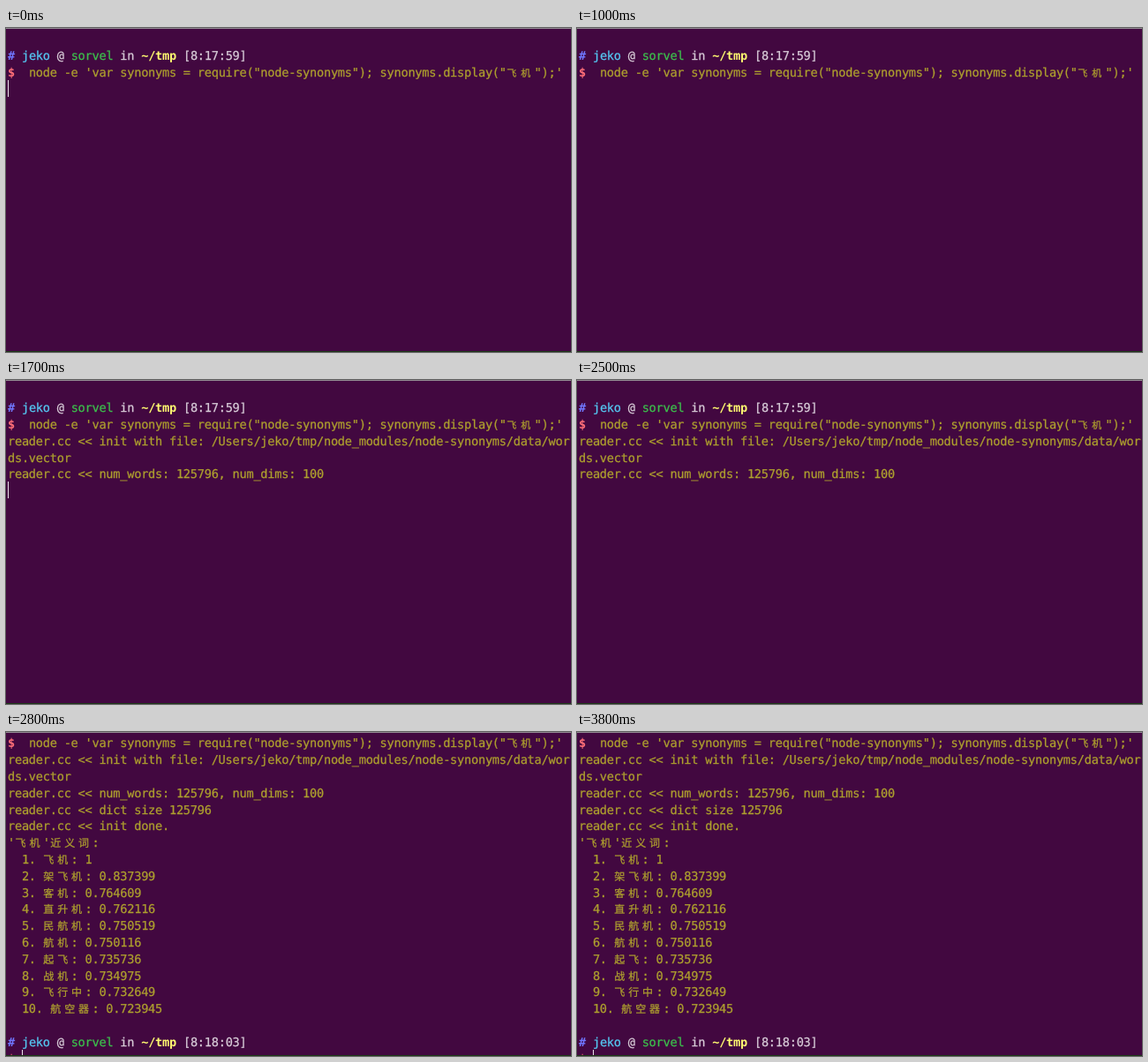
Recreate the animation shown at these times as an HTML page. Size 640 by 367 pixels, loop 3900 ms.

```html
<!DOCTYPE html>
<html lang="zh-Hans">
<head>
<meta charset="utf-8">
<title>Terminal</title>
<style>
  html, body { margin: 0; width: 100%; height: 100%; overflow: hidden; background: #420840; }
  #stage { position: relative; width: 640px; height: 367px; overflow: hidden; background: #420840; }
  #screen {
    position: absolute; left: 2px; top: 21.4px;
    font: 13.6px/18.8px "DejaVu Sans Mono", monospace; letter-spacing: -.23px;
    text-rendering: geometricPrecision; font-variant-ligatures: none;
    -webkit-text-stroke: .25px; color: #aea02e;
  }
  .row { position: absolute; left: 0; height: 18.8px; padding-top: 1.8px; white-space: pre; }
  .bold { font-weight: bold; -webkit-text-stroke: 0; }
  .blue { color: #7078ff; }
  .cyan { color: #55c8f2; }
  .green { color: #3cc04c; }
  .white { color: #d8ccd8; }
  .yellow { color: #fffa70; }
  .red { color: #ff7078; }
  .han {
    display: inline-block; width: 15.91px; text-indent: .5px;
    font: 12px/1 "Noto Sans CJK SC", "Noto Sans CJK", sans-serif;
  }
  .small .han { font-size: 11px; }
  #cursor { position: absolute; width: 1px; height: 18.8px; background: #eee4ee; }
  .edge { position: absolute; left: 0; width: 640px; height: 1px; }
  #top { top: 0; background: #918a91; }
  #bottom { top: 366px; background: #1d3a18; }
</style>
</head>
<body>
<div id="stage">
  <div id="screen"><div id="cursor"></div></div>
  <div id="top" class="edge"></div>
  <div id="bottom" class="edge"></div>
</div>
<script>
const LOOP = 3900, LINE = 18.8, CELL = 7.956;
const screen = document.getElementById('screen');
const cursor = document.getElementById('cursor');

const markup = text => text
  .replace(/&/g, '&amp;').replace(/</g, '&lt;')
  .replace(/[\u4e00-\u9fff]/g, '<span class="han">$&</span>');
const paint = (style, text) => `<span class="${style}">${markup(text)}</span>`;
const prompt = time =>
  paint('bold blue', '#') + ' ' + paint('cyan', 'jeko') + paint('white', ' @ ') +
  paint('green', 'sorvel') + paint('white', ' in ') + paint('bold yellow', '~/tmp') +
  paint('white', ` [${time}]`);

const words = [
  ['飞机', '1'], ['架飞机', '0.837399'], ['客机', '0.764609'], ['直升机', '0.762116'],
  ['民航机', '0.750519'], ['航机', '0.750116'], ['起飞', '0.735736'], ['战机', '0.734975'],
  ['飞行中', '0.732649'], ['航空器', '0.723945']
];

const lines = [
  prompt('8:17:59'),
  paint('bold red', '$') +
    markup(`  node -e 'var synonyms = require("node-synonyms"); synonyms.display("飞机");'`),
  ...[
    'reader.cc << init with file: /Users/jeko/tmp/node_modules/node-synonyms/data/wor',
    'ds.vector',
    'reader.cc << num_words: 125796, num_dims: 100',
    'reader.cc << dict size 125796',
    'reader.cc << init done.',
    "'飞机'近义词:",
    ...words.map(([word, score], i) => `  ${i + 1}. ${word}: ${score}`),
    ''
  ].map(markup),
  prompt('8:18:03'),
  paint('bold red', '$')
];

const rows = lines.map(html => {
  const row = document.createElement('div');
  row.className = 'row';
  row.innerHTML = html;
  screen.append(row);
  return row;
});

// start time, rows printed, rows scrolled off, cursor column
const output = [
  [0, 2, 0, 0],
  [1200, 5, 0, 0],
  [2700, 18, 0, 0],
  [2800, 21, 2, 2]
];
// spans during which the cursor is dark
const dark = [[700, 1200], [1900, 2700], [3200, 3800]];

function draw(t) {
  const [, count, scroll, column] = output.filter(step => step[0] <= t).pop();
  rows.forEach((row, i) => {
    row.style.top = (i - scroll) * LINE + 'px';
    row.style.visibility = i < count && i >= scroll - 1 ? 'visible' : 'hidden';
  });
  rows[1].classList.toggle('small', count < 18);
  const line = column ? count - 1 : count;
  cursor.style.left = column * CELL + 'px';
  cursor.style.top = (line - scroll) * LINE + 'px';
  cursor.style.visibility = dark.some(([a, b]) => t >= a && t < b) ? 'hidden' : 'visible';
}

const start = performance.now();
function tick() {
  draw((performance.now() - start) % LOOP);
  requestAnimationFrame(tick);
}
tick();
</script>
</body>
</html>
```
